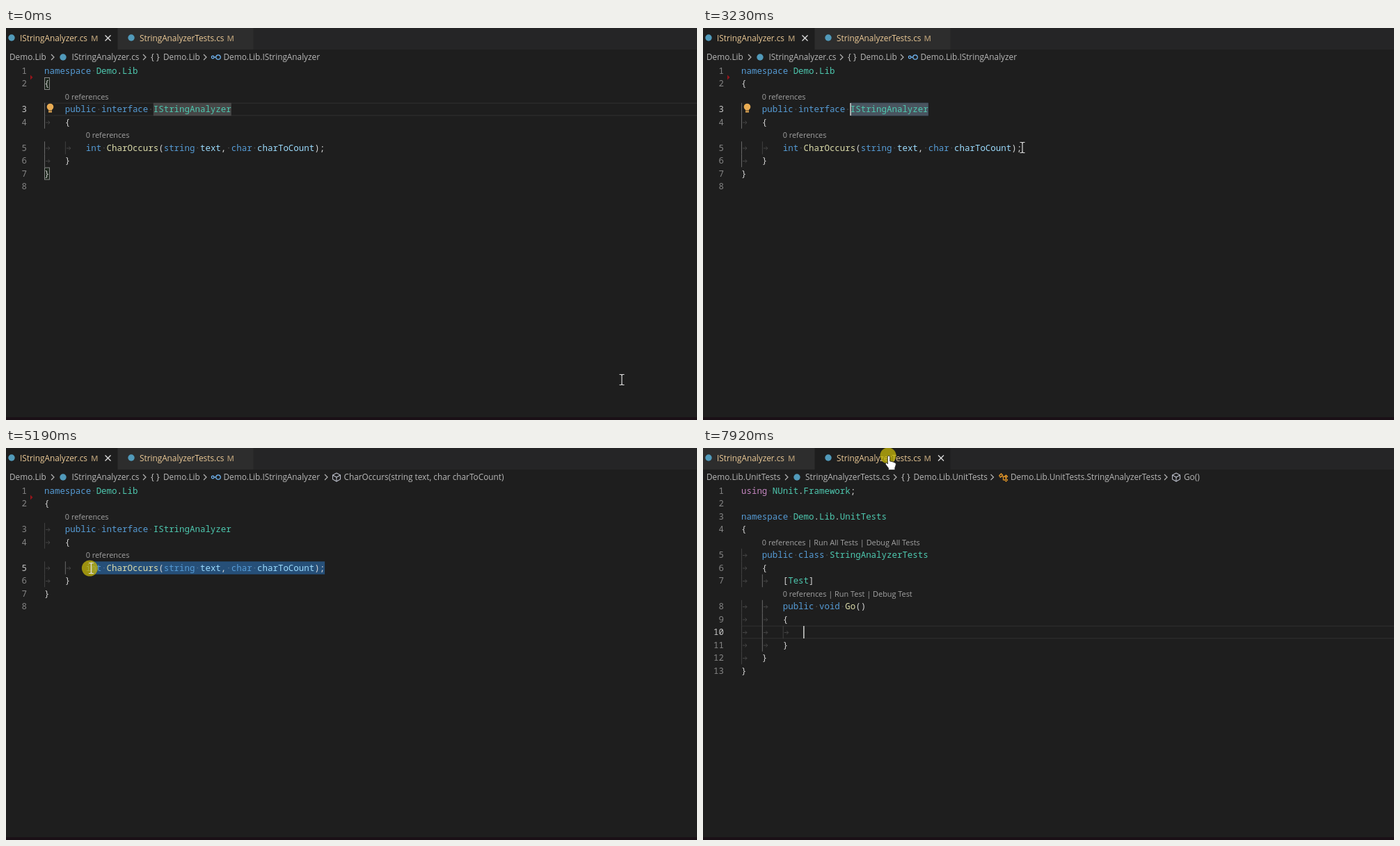
These frames come from a looping animation (993x564 px, 7.99 s). An HTML page with a canvas:

```html
<!DOCTYPE html>
<html lang="en">
<head>
<meta charset="utf-8">
<title>Editor</title>
<style>
html, body { margin: 0; width: 100%; height: 100%; overflow: hidden; background: #1e1e1e; }
canvas { display: block; }
</style>
</head>
<body>
<canvas id="stage" width="993" height="564"></canvas>
<script>
const ctx = document.getElementById('stage').getContext('2d');
const LOOP = 7990, LEFT = 55, CHAR = 7.465, ROW = 18.5;
const MONO = '12.44px "Noto Sans Mono", monospace';
const UI = '"Open Sans", "Noto Sans", sans-serif';
const TAB_FONT = '11.8px ' + UI, LENS_FONT = '10.9px ' + UI;

const CLICK_LINE = 3370, METHOD_CRUMB = 4830, BULB_OFF = 5050, SWITCH = 7600;
const PRESSES = [[1010, 2470], [3300, 5730], [7510, LOOP]];

// time, x, y, eased
const PATH = [
  [0, 883, 506], [820, 308, 118, 1], [890, 308, 118], [1010, 325, 117], [1080, 325, 117],
  [1290, 285, 116], [1640, 231, 116], [2140, 211, 116], [2400, 211, 116], [3230, 457, 172, 1],
  [3440, 457, 172], [3920, 350, 173], [4550, 150, 173], [4690, 134, 173], [4900, 125, 173],
  [5530, 115, 173], [5660, 115, 173], [5930, 362, 200, 1], [6140, 362, 200], [6350, 359, 200],
  [6610, 359, 200], [7440, 266, 13, 1], [7920, 266, 11], [LOOP, 266, 11]
];

// Drags: row, first and last column, time of release, time the caret rests
const DRAG_NAME = { row: 3, first: 21, last: 36, release: 2400, rest: 2140 };
const DRAG_METHOD = { row: 6, first: 8, last: 54, release: 5660, rest: 5150 };

// line number (0 = lens row), indent level, text
const INTERFACE = [
  [1, 0, 'namespace Demo.Lib'], [2, 0, '{'],
  [0, 1, '0 references'],
  [3, 1, 'public interface IStringAnalyzer'], [4, 1, '{'],
  [0, 2, '0 references'],
  [5, 2, 'int CharOccurs(string text, char charToCount);'],
  [6, 1, '}'], [7, 0, '}'], [8, 0, '']
];
const TESTS = [
  [1, 0, 'using NUnit.Framework;'], [2, 0, ''],
  [3, 0, 'namespace Demo.Lib.UnitTests'], [4, 0, '{'],
  [0, 1, '0 references | Run All Tests | Debug All Tests'],
  [5, 1, 'public class StringAnalyzerTests'], [6, 1, '{'],
  [7, 2, '[Test]'],
  [0, 2, '0 references | Run Test | Debug Test'],
  [8, 2, 'public void Go()'], [9, 2, '{'], [10, 3, ''], [11, 2, '}'],
  [12, 1, '}'], [13, 0, '}']
];
const SYNTAX = [
  [/^using$/, '#c586c0'],
  [/^(namespace|public|interface|class|int|string|char|void)$/, '#569cd6'],
  [/^(Demo|Lib|UnitTests|IStringAnalyzer|StringAnalyzerTests|NUnit|Framework|Test)$/, '#4ec9b0'],
  [/^(CharOccurs|Go)$/, '#dcdcaa'],
  [/^(text|charToCount)$/, '#9cdcfe']
];

const colX = col => LEFT + col * CHAR;
const rowY = row => 61.5 + row * ROW;

function rect(x, y, w, h, color) {
  ctx.fillStyle = color;
  ctx.fillRect(x, y, w, h);
}
function text(str, x, y, font, color, align = 'left') {
  ctx.font = font;
  ctx.fillStyle = color;
  ctx.textAlign = align;
  ctx.fillText(str, x, y);
}
function line(color, width, ...pts) {
  ctx.strokeStyle = color;
  ctx.lineWidth = width;
  ctx.beginPath();
  for (let i = 0; i < pts.length; i += 2) ctx.lineTo(pts[i], pts[i + 1]);
  ctx.stroke();
}
function dot(x, y, r, color) {
  ctx.fillStyle = color;
  ctx.beginPath();
  ctx.arc(x, y, r, 0, 7);
  ctx.fill();
}
function ring(x, y, r, color) {
  ctx.strokeStyle = color;
  ctx.lineWidth = 1.2;
  ctx.beginPath();
  ctx.arc(x, y, r, 0, 7);
  ctx.stroke();
}

function mouseAt(t) {
  const i = Math.max(1, PATH.findIndex(k => k[0] >= t));
  const [t0, x0, y0] = PATH[i - 1], [t1, x1, y1, eased] = PATH[i];
  let p = Math.min(1, Math.max(0, (t - t0) / (t1 - t0)));
  if (eased) p = p * p * (3 - 2 * p);
  return [x0 + (x1 - x0) * p, y0 + (y1 - y0) * p];
}

// The caret trails the mouse slightly and stays put once released
function caretCol(t, drag) {
  const x = mouseAt(Math.min(t - 30, drag.release))[0];
  return Math.min(drag.last, Math.max(drag.first, Math.round((x - LEFT) / CHAR)));
}

const icons = {
  file: x => dot(x + 6, 42, 4.7, '#519aba'),
  space: x => {
    text('{', x, 46, '12.5px ' + UI, '#c5c5c5');
    text('}', x + 8, 46, '12.5px ' + UI, '#c5c5c5');
  },
  iface: x => {
    ring(x + 2.2, 42, 1.8, '#75beff');
    line('#75beff', 1.2, x + 4, 42, x + 7, 42);
    ring(x + 10, 42, 3.2, '#75beff');
  },
  cls: x => {
    const c = '#ee9d28';
    line(c, 1.3, x + 1, 40, x + 4, 37, x + 6, 39, x + 3, 42, x + 1, 40);
    line(c, 1.2, x + 5, 41, x + 12, 41);
    line(c, 1.2, x + 7, 41, x + 7, 46, x + 9, 46);
    line(c, 1.2, x + 9, 41, x + 11, 39, x + 13, 41, x + 11, 43, x + 9, 41);
    line(c, 1.2, x + 9, 46, x + 11, 44, x + 13, 46, x + 11, 48, x + 9, 46);
  },
  method: x => {
    const c = '#b9bcc8';
    line(c, 1.1, x + 6, 36, x + 11.5, 39, x + 11.5, 45, x + 6, 48, x + .5, 45, x + .5, 39, x + 6, 36);
    line(c, 1.1, x + .5, 39, x + 6, 42, x + 11.5, 39);
    line(c, 1.1, x + 6, 42, x + 6, 48);
  }
};

function crumb(label, x, icon, iconX) {
  if (icon) {
    line('#b4b4b4', 1.2, iconX - 11, 38, iconX - 7, 42, iconX - 11, 46);
    icons[icon](iconX);
  }
  text(label, x, 46, TAB_FONT, '#b8b8b8');
}

function tab(x, w, label, active, start, markX, closeAlpha) {
  rect(x, 0, w, 31, active ? '#1e1e1e' : '#2d2d2d');
  dot(start - 12, 14, 4.7, '#519aba');
  text(label, start, 19, TAB_FONT, '#ecca96');
  text('M', markX, 18.5, '600 11.4px ' + UI, '#ab936f');
  const cx = markX + 24.5, cy = 14.5;
  ctx.globalAlpha = closeAlpha;
  line('#e0e0e0', 1.3, cx - 4, cy - 4, cx + 4, cy + 4);
  line('#e0e0e0', 1.3, cx - 4, cy + 4, cx + 4, cy - 4);
  ctx.globalAlpha = 1;
}

function header(second, hover) {
  rect(0, 0, 993, 31, '#252526');
  tab(0, 160, 'IStringAnalyzer.cs', !second, 20, 122, second ? 0 : 1);
  tab(161, 194.5, 'StringAnalyzerTests.cs', second, 192, 317.5, second ? 1 : hover ? .6 : 0);
}

function codeLine(str, x, y) {
  for (const word of str.match(/\w+|\W/g) || []) {
    if (word === ' ') dot(x + CHAR / 2, y, .85, 'rgba(227,228,226,.25)');
    else {
      const rule = SYNTAX.find(s => s[0].test(word));
      text(word, x, y + 4.3, MONO, rule ? rule[1] : '#d4d4d4');
    }
    x += word.length * CHAR;
  }
}

function code(lines, current, activeLevel) {
  lines.forEach(([num, indent, str], row) => {
    const y = rowY(row), x = colX(indent * 4);
    if (!num) return text(str, x, y + 4, LENS_FONT, '#a2a2a2');
    text(num, 30, y + 4.3, MONO, num === current ? '#c6c6c6' : '#858585', 'right');
    for (let i = 0; i < indent; i++) {
      const gx = colX(i * 4);
      rect(gx, y - 9.25, 1, ROW, i === activeLevel ? '#686868' : '#404040');
      line('#444', 1, gx + 2, y + .5, gx + 8, y + .5);
      line('#444', 1, gx + 5.5, y - 2, gx + 8, y + .5, gx + 5.5, y + 3);
    }
    codeLine(str, x, y);
  });
}

function lineBorder(row) {
  rect(LEFT, rowY(row) - 9.5, 938, 1.5, '#2a2a2a');
  rect(LEFT, rowY(row) + 8, 938, 1.5, '#2a2a2a');
}
function bracketBox(row, col) {
  rect(colX(col), rowY(row) - 9, CHAR, 18, 'rgba(0,100,0,.1)');
  ctx.strokeStyle = '#888';
  ctx.lineWidth = 1;
  ctx.strokeRect(colX(col) + .5, rowY(row) - 8.5, CHAR - .5, 17);
}
function span(row, from, to, color) {
  rect(colX(from), rowY(row) - 9.25, (to - from) * CHAR, ROW, color);
}
function caret(row, col) {
  rect(colX(col) - .5, rowY(row) - 9, 1.6, 18, '#c8c9c7');
}
function bulb() {
  rect(57, 108.5, 12, 17, '#1e1e1e');
  dot(63.5, 113.5, 4.8, '#e8ab53');
  rect(61, 116, 5, 5.5, '#e8ab53');
  rect(61, 118.6, 5, .8, '#1e1e1e');
}

function interfaceFile(t) {
  crumb('Demo.Lib', 5);
  crumb('IStringAnalyzer.cs', 94.5, 'file', 76);
  crumb('Demo.Lib', 226, 'space', 208);
  crumb('Demo.Lib.IStringAnalyzer', 312.5, 'iface', 295);
  if (t >= METHOD_CRUMB) crumb('CharOccurs(string text, char charToCount)', 485.5, 'method', 469);

  const method = t >= CLICK_LINE, drag = method ? DRAG_METHOD : DRAG_NAME;
  const col = caretCol(t, drag), selecting = t >= 1080;
  if (selecting) span(drag.row, col, drag.last, '#264f78');
  else lineBorder(drag.row);
  if (!method) span(3, 21, 36, 'rgba(87,87,87,.72)');
  if (t < 1500) [1, 8].forEach(r => bracketBox(r, 0));
  if (method && t < METHOD_CRUMB) [4, 7].forEach(r => bracketBox(r, 4));

  code(INTERFACE, method ? 5 : 3, method ? 1 : 0);
  ctx.fillStyle = '#94151b';
  ctx.beginPath();
  ctx.moveTo(35, 67.5);
  ctx.lineTo(38.5, 71);
  ctx.lineTo(35, 74.5);
  ctx.fill();
  if (t < BULB_OFF) bulb();
  const still = t - drag.rest;
  if (selecting && (still < 0 || Math.floor(still / 530) % 2 === 0)) caret(drag.row, col);
}

function testsFile() {
  crumb('Demo.Lib.UnitTests', 5);
  crumb('StringAnalyzerTests.cs', 147, 'file', 129);
  crumb('Demo.Lib.UnitTests', 302.5, 'space', 285);
  crumb('Demo.Lib.UnitTests.StringAnalyzerTests', 442, 'cls', 424.5);
  crumb('Go()', 691, 'method', 674);
  lineBorder(11);
  code(TESTS, 10, 1);
  caret(11, 12);
}

function beam(x, y) {
  const c = '#dcdcdc';
  line(c, 1.2, x, y - 7, x, y + 7);
  for (const s of [-1, 1])
    line(c, 1.2, x - 3.5, y + 7.5 * s, x - 1, y + 7.5 * s, x, y + 6.5 * s, x + 1, y + 7.5 * s, x + 3.5, y + 7.5 * s);
}

const HAND = new Path2D('M-1.6 1Q0-1 1.6 1V8L4 8.4 6.5 9.2 9 10.2Q10.5 11 10.3 13L8.8 17.5V20.5H-.5V18L-4.6 12.5Q-5 10-3.2 10L-1.6 12Z');
function hand(x, y) {
  ctx.save();
  ctx.translate(x, y);
  ctx.fillStyle = '#fff';
  ctx.fill(HAND);
  ctx.strokeStyle = '#222';
  ctx.lineWidth = .8;
  ctx.stroke(HAND);
  ctx.restore();
}

function draw(t) {
  const [x, y] = mouseAt(t);
  rect(0, 0, 993, 564, '#1e1e1e');
  header(t >= SWITCH, y < 31);
  if (t < SWITCH) interfaceFile(t);
  else testsFile();
  rect(0, 560, 993, 4, '#1a1016');
  if (PRESSES.some(([from, to]) => t >= from && t < to)) dot(x, y, 11.5, 'rgba(196,182,10,.76)');
  if (y < 52) hand(x + 1, y);
  else beam(x + 2, y);
}

const begin = performance.now();
function tick() {
  draw((performance.now() - begin) % LOOP);
  requestAnimationFrame(tick);
}
tick();
</script>
</body>
</html>
```
